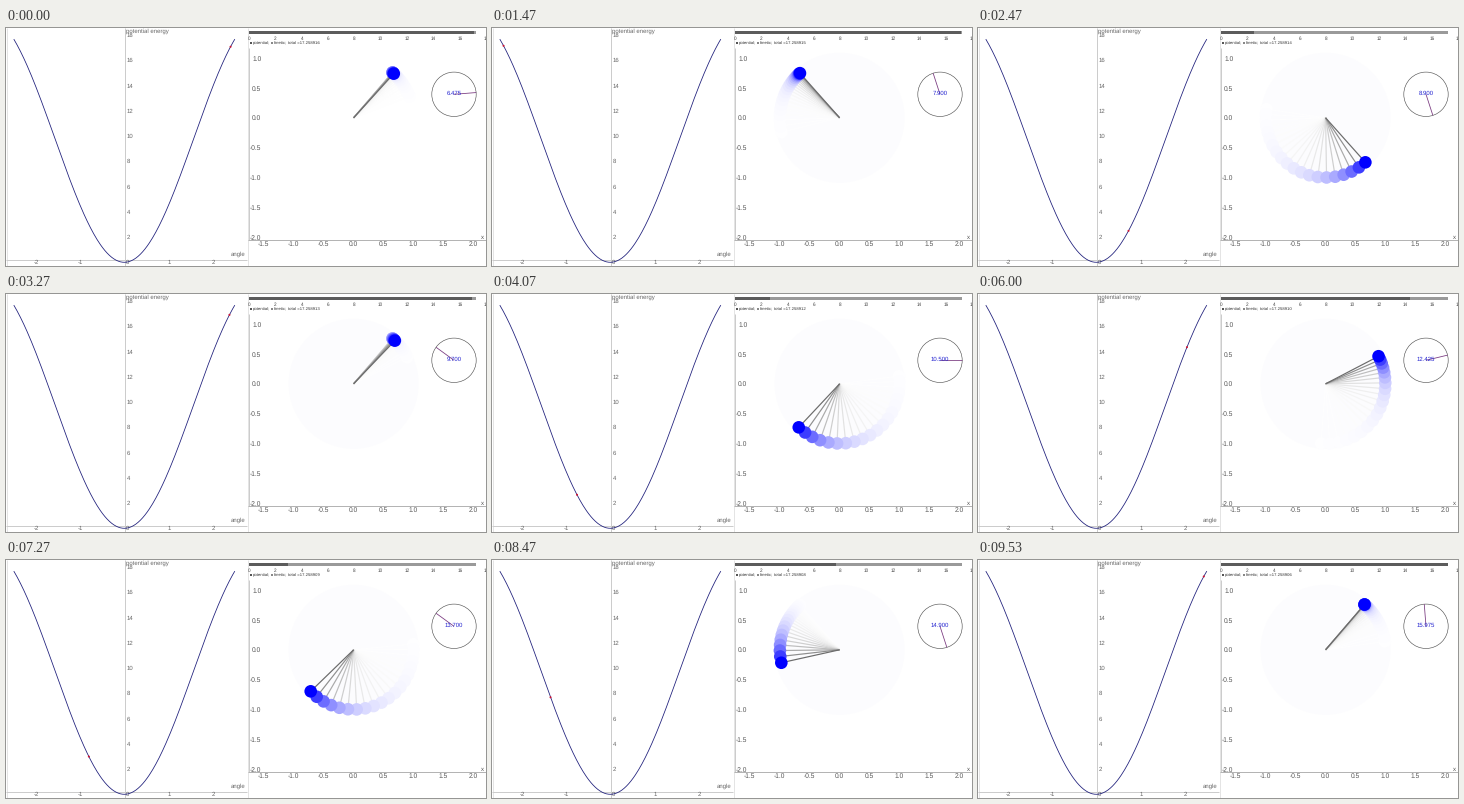
Write a matplotlib script that moves like this. It is 480 px wide and 238 px high and loops after 9.59 s.

```python
import math
import numpy as np
import matplotlib.pyplot as plt
from matplotlib.animation import FuncAnimation
from matplotlib.patches import Circle, Rectangle

W, H, DPI = 480, 238, 64
PT = 72 / DPI
LOOP_MS, FRAMES = 9590, 144

G = 9.81
ENERGY = 17.258916
START, STEP = 6.475, 0.025
TURN, PERIOD = 6.379, 3.191     # time of a right-hand turning point, swing period
TRAIL, FADE = 20, 0.76

PIVOT, ROD = (347.6, 89.8), 59.7
CLOCK, CLOCK_R = (448, 66.3), 22.2
BAR_X, BAR_UNIT = 243, 13.17
BLUE = np.array([0, 0, 1.0])
GRAY = np.array([0.42, 0.42, 0.42])

plt.rcParams["font.family"] = "Liberation Sans"
plt.rcParams["text.hinting"] = "none"
fig = plt.figure(figsize=(W / DPI, H / DPI), dpi=DPI, facecolor="white")
ax = fig.add_axes([0, 0, 1, 1])
ax.set_xlim(0, W)
ax.set_ylim(H, 0)
ax.axis("off")


def label(x, y, s, size=6, color="#666666", ha="center", z=3):
    return ax.text(x, y, s, fontsize=size * PT, color=color, ha=ha,
                   va="center_baseline", zorder=z)


def line(xs, ys, color, width=1, z=2):
    return ax.plot(xs, ys, color=color, lw=width * PT, zorder=z,
                   solid_capstyle="butt")[0]


def box(x, y, w, h, color):
    return ax.add_patch(Rectangle((x, y), w, h, fc=color, ec="none", zorder=2))


def swing_table(n=3000):
    """Angle over one full period, released at rest on the right."""
    amp = math.acos(1 - ENERGY / G)
    dt = 3.1816 / n
    angle, speed = amp, 0.0
    out = [angle]
    for _ in range(n):
        speed -= G * math.sin(angle) * dt / 2
        angle += speed * dt
        speed -= G * math.sin(angle) * dt / 2
        out.append(angle)
    return np.array(out)


SWING = swing_table()
PHASE = np.linspace(0, 1, len(SWING))


def angle_at(t):
    return float(np.interp(((t - TURN) / PERIOD) % 1, PHASE, SWING))


def potential(a):
    return G * (1 - np.cos(a))


def graph_xy(a):
    return 118.3 + 44.2 * a, 234.3 - 12.63 * potential(a)


def bob_xy(a):
    return PIVOT[0] + ROD * math.sin(a), PIVOT[1] + ROD * math.cos(a)


def sim_time(k):
    steps = math.floor((k / 15 - 0.03) / STEP)
    return START + STEP * max(0, steps)


def draw_graph():
    line([0.5, 0.5], [0, H], "#e4e4e4")
    line([241.5, 241.5], [0, H], "#e4e4e4")
    line([0, 241], [231.5, 231.5], "#cccccc")
    line([118.5, 118.5], [0, H], "#cccccc")
    for v in range(2, 19, 2):
        label(121, 234.3 - 12.63 * v, str(v), ha="left")
    for a in (-2, -1, 0, 1, 2):
        label(118.8 + 44.2 * a + (2.5 if a == 0 else 0), 233.7, str(a))
    label(120, 2.3, "potential energy", 6, ha="left")
    label(239.5, 226, "angle", 6, ha="right")
    line(*graph_xy(np.linspace(-2.5, 2.5, 200)), "#20207c", 0.8, z=4)


def draw_scene():
    line([242.5, 242.5], [20, 212], "#cccccc")
    line([242, W], [211.5, 211.5], "#b4b4b4")
    for i in range(-3, 5):
        label(PIVOT[0] + 29.9 * i, 215.6, f"{i / 2:.1f}", 6.6, "#555555")
    for i in range(-4, 3):
        label(255.3, PIVOT[1] - 29.85 * i, f"{i / 2:.1f}", 6.6, "#555555",
              ha="right")
    label(476, 208.5, "x", 6, "#555555")
    ax.add_patch(Circle(CLOCK, CLOCK_R, fill=False, ec="#505050",
                        lw=0.6 * PT, zorder=3))


def draw_bar():
    for v in range(0, 20, 2):
        label(BAR_X + BAR_UNIT * v, 9.8, str(v), 4.6, "#444444")
    box(243.5, 13.5, 2.6, 2.8, "#555555")
    box(264.5, 13.5, 2.6, 2.8, "#888888")
    label(247, 15, "potential;", 4.2, "#333333", ha="left")
    label(268, 15, "kinetic;", 4.2, "#333333", ha="left")


draw_graph()
draw_scene()
draw_bar()

kinetic_bar = box(BAR_X, 3, BAR_UNIT * ENERGY, 3, "#9a9a9a")
potential_bar = box(BAR_X, 3, 0, 3, "#5c5c5c")
total = label(282.3, 15, "", 4.2, "#333333", ha="left")
dot = ax.add_patch(Circle((0, 0), 1, fc="#d01030", ec="none", zorder=5))
haze = ax.add_patch(Circle(PIVOT, 65, fc="#fcfcfe", ec="none", zorder=1))
hand = line([], [], "#7a3a80", 0.8, z=4)
clock_text = label(CLOCK[0], 65, "", 6, "#2222d0", z=5)

rods, bobs = [], []
for j in range(TRAIL):
    shade = FADE ** j
    z = 10 - j * 0.2
    rods.append(line([], [], 1 - shade * (1 - GRAY), 1.2, z=z))
    bobs.append(ax.add_patch(Circle((0, 0), 6.3, fc=1 - shade * (1 - BLUE),
                                    ec="none", zorder=z + 0.1)))


def update(k):
    t = sim_time(k)
    a = angle_at(t)

    for j, (rod, bob) in enumerate(zip(rods, bobs)):
        x, y = bob_xy(angle_at(t - j * STEP))
        rod.set_data([PIVOT[0], x], [PIVOT[1], y])
        bob.center = x, y

    dot.center = graph_xy(a)
    potential_bar.set_width(BAR_UNIT * potential(a))
    total.set_text(f"total ={ENERGY - 1e-6 * (t - START):.6f}")
    haze.set_alpha(min(1, k / 20))

    turn = math.pi * (0.5 - t)
    hand.set_data([CLOCK[0], CLOCK[0] + CLOCK_R * math.cos(turn)],
                  [CLOCK[1], CLOCK[1] - CLOCK_R * math.sin(turn)])
    clock_text.set_text(f"{t:.3f}")
    return [*rods, *bobs, dot, potential_bar, total, haze, hand, clock_text]


anim = FuncAnimation(fig, update, frames=FRAMES, interval=LOOP_MS / FRAMES,
                     repeat=True, repeat_delay=0, blit=False)
plt.show()
```
